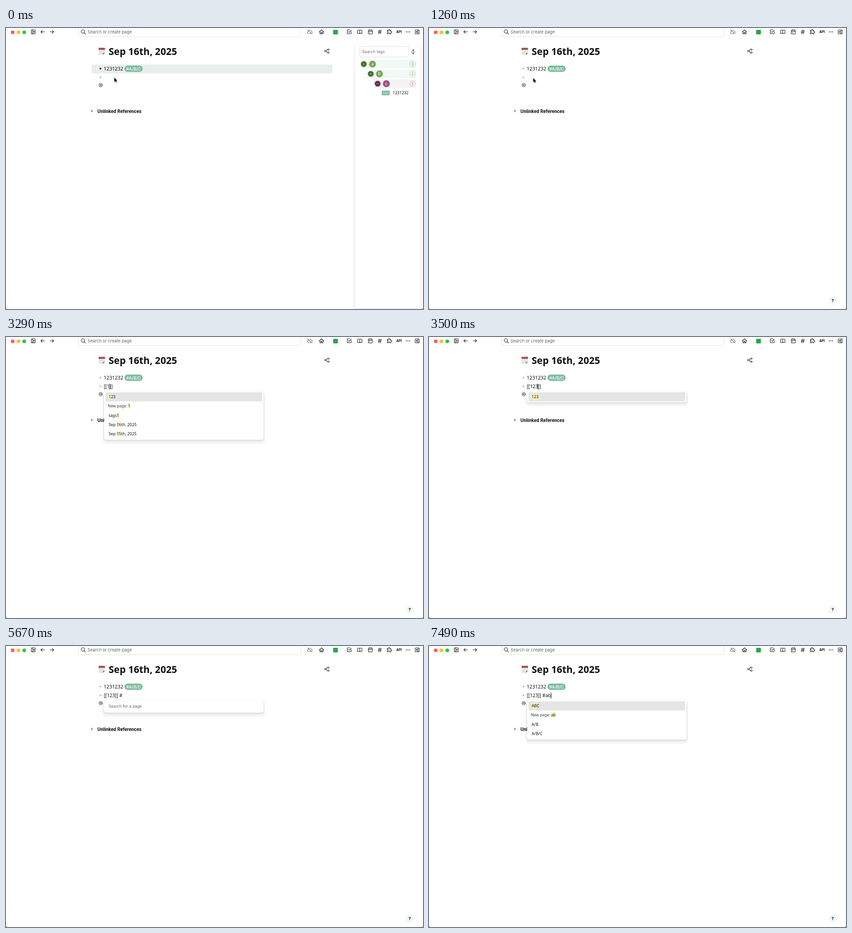
Animation of 910 by 615 pixels, one loop 8 s. Source, as an HTML page:

```html
<!DOCTYPE html>
<html lang="en">
<head>
<meta charset="utf-8">
<title>Notes</title>
<style>
  html, body { margin: 0; width: 100%; height: 100%; overflow: hidden; background: #8d9190; }
  #stage { position: absolute; left: 0; top: 0; width: 910px; height: 615px; overflow: hidden;
    background: #fff; border-radius: 0 0 4px 4px; color: #0c1110; font-family: "Noto Sans", sans-serif; }
  svg { position: absolute; left: 0; top: 0; }
  text { fill: #0c1110; }
  .ui { font-family: Inter, sans-serif; }
  .icon { fill: none; stroke: #141817; stroke-width: 1.05; stroke-linecap: round; stroke-linejoin: round; }
  .thin { stroke-width: .95; }
  .mid { text-anchor: middle; }
  #line { position: absolute; left: 213.4px; top: 98.2px; line-height: 20px; font-size: 10.3px; white-space: pre; }
  #caret { display: inline-block; width: 1px; height: 13px; margin: 0 -.5px; vertical-align: -3px; background: #111; }
  #popup { position: absolute; left: 214px; top: 118px; width: 348px; box-sizing: border-box; padding: 2.5px 3px;
    background: #fff; border-radius: 4px; font-size: 8.8px; white-space: pre;
    box-shadow: 0 0 1px rgba(0,0,0,.22), 0 2px 4px rgba(0,10,8,.13), 0 6px 1px 3px rgba(0,10,8,.036); }
  .item { height: 20.2px; line-height: 20.2px; padding-left: 7px; border-radius: 2px; }
  .item:first-child { background: #e4e6e5; }
  .item.new { height: 21px; padding-left: 5px; font-size: 8.5px; color: #33403c; }
  .hint { height: 23px; padding-left: 7px; font: 8.6px/23px Inter, sans-serif; color: #5c6764; }
  mark { background: #fbf3b2; color: #0c1110; border-radius: 2px; }
  #panel { position: absolute; left: 762px; top: 38px; width: 142px; height: 575px; background: #fff;
    border-radius: 4px; box-shadow: 0 0 1px rgba(0,0,0,.12), 0 2px 4px rgba(0,0,0,.05), 0 4px 1px 5px rgba(0,10,8,.028); }
</style>
</head>
<body>
<div id="stage">
  <svg width="910" height="615">
    <circle cx="14.5" cy="9.5" r="4" fill="#fe5f57"/><circle cx="27.2" cy="9.5" r="4" fill="#febc2e"/><circle cx="39.8" cy="9.5" r="4" fill="#28c840"/>
    <path d="M158.500 0V15.500q0 3.500 3.500 3.500H640q3.500 0 3.500-3.500V0" fill="none" stroke="#dfe3e1"/>
    <text class="ui" x="178" y="12.400" font-size="9.200" style="fill:#5f6664">Search or create page</text>

    <g class="icon">
      <rect x="55.200" y="4" width="8.600" height="8.600" rx="1"/>
      <path d="M58 4v8.600M60.300 6.800l1.700 1.500-1.700 1.500z"/>
      <path d="M84 8.300H76M79.300 5l-3.300 3.300 3.300 3.300M96 8.300h8M100.700 5l3.300 3.300-3.300 3.300"/>
      <circle cx="167.800" cy="7.500" r="3.700"/><path d="M170.600 10.300l3 3"/>
      <path stroke="#707775" d="M661 5.300q4.500-2 5.500 2.200 2.300.3 1.800 2.800M666 12h-6q-2.600-.3-2.500-2.400.2-2 2.600-2.300M658 4l10 9"/>
      <path d="M683.500 8.700l5-4.700 5 4.700M685 7.500v5.200h7V7.500M687.300 12.500V9.300h2.400v3.200"/>
      <path d="M753.300 7.800v3.700q0 1-1 1h-6.600q-1 0-1-1V5q0-1 1-1h5M747 7.900l1.800 1.800 4.800-4.900"/>
      <path d="M772 5.200q-2.500-1.400-4.800-.3v7q2.400-1 4.800.4 2.400-1.400 4.800-.4v-7q-2.300-1.100-4.800.3zv7"/>
      <rect x="790.700" y="4.500" width="8.600" height="8.500" rx="1"/>
      <path d="M793 3.200v2M797 3.200v2M791 7.500h8M793 10h1.500"/>
      <path d="M812.200 6.800h7.300M811.700 10h7.300M814.800 4l-1.300 9M818 4l-1.300 9"/>
      <path d="M833 5.600h1.900q-.6-2.400 1.300-2.400t1.300 2.400h2.200v2.300q2.200-.5 2.200 1.200t-2.200 1.300v2.400h-2.300q.3-2-1.200-2t-1.300 2H832v-2.700q1.900.2 1.900-1.300t-1.900-1.300V5.600z"/>
      <rect x="893" y="4.300" width="8.800" height="8.500" rx="1"/>
      <path d="M899 4.300v8.500M896.900 7l-1.600 1.500 1.600 1.500z"/>
      <g class="thin">
        <circle cx="696.400" cy="50.500" r="1.700"/><circle cx="703.500" cy="47.300" r="1.700"/><circle cx="703.500" cy="53.900" r="1.700"/>
        <path d="M698.100 50.500h1.500M701.800 47.300h-1q-1.200 0-1.200 1.200v4.200q0 1.200 1.200 1.200h1"/>
        <circle cx="206.700" cy="125.100" r="3.600"/>
      </g>
    </g>
    <rect x="714" y="4" width="10.200" height="10" rx="1" fill="#28a745"/>
    <text class="ui mid" x="857.600" y="10.900" font-size="7.100" font-weight="700">API</text>
    <g fill="#141817"><circle cx="873.500" cy="8.400" r="1"/><circle cx="877.200" cy="8.400" r="1"/><circle cx="880.900" cy="8.400" r="1"/><circle cx="206.700" cy="125.100" r="1.300"/></g>

    <g id="notepad">
      <path d="M202.500 44h13.200v10.500l-4 4.200h-9.200z" fill="#e9e9e9" stroke="#cbd0cf" stroke-width=".5"/>
      <rect x="202" y="43.200" width="14" height="4.600" rx=".8" fill="#9a4a48"/>
      <path d="M204 43v1.500M207.300 43v1.500M210.600 43v1.500M213.900 43v1.500" stroke="#e6dada" stroke-width=".8"/>
      <path d="M204 50.500h10M204 53h9M204 55.500h6" stroke="#d2d7d5" stroke-width=".6"/>
      <path d="M215.700 54.500l-4 4.200-.3-4z" fill="#5d7c67"/>
    </g>
    <text x="224" y="59" font-size="21" font-weight="700">Sep 16th, 2025</text>

    <rect id="bar" x="187" y="80" width="525" height="19.500" fill="#e9eeec"/>
    <circle cx="206" cy="88.800" r="2" fill="#b9bfbd"/>
    <circle id="dot" cx="206" cy="88.800" r="2.100" fill="#222927"/>
    <circle cx="206" cy="108" r="2" fill="#bcc2c0"/>
    <text x="213.300" y="92.700" font-size="10.600" font-weight="500">1231232</text>
    <rect x="258.500" y="82.300" width="39.700" height="13.800" rx="6.900" fill="#7dbb9f"/>
    <text class="ui mid" x="278.300" y="92.600" font-size="9.100" font-weight="500" style="fill:#fff">#A/B/C</text>

    <path d="M186 178.200l4 3.400-4 3.400z" fill="#8b918f"/>
    <text x="199.600" y="186" font-size="10.350" font-weight="600" style="font-family:Roboto,sans-serif">Unlinked References</text>
    <circle cx="881" cy="596.500" r="10" fill="#f5f8f7"/>
    <text class="ui mid" x="881" y="600" font-size="9.500" font-weight="700">?</text>
  </svg>

  <div id="line"><span id="before"></span><span id="caret"></span><span id="after"></span></div>
  <div id="popup"></div>

  <div id="side">
    <div id="panel"></div>
    <svg id="tree" width="910" height="615">
      <rect x="772" y="40.500" width="106" height="23" rx="3" fill="#fff" stroke="#dcdfde"/>
      <text class="ui" x="777" y="55.200" font-size="8.800" style="fill:#6c7371">Search tags</text>
      <path class="icon thin" d="M884.500 52h1M888 52h1M891.500 52h1M888.500 46.500v3.500M887 48.700l1.500 1.500 1.500-1.500M888.500 57.500v-3.500M887 55.300l1.500-1.500 1.500 1.500"/>
      <rect x="820" y="137" width="17.300" height="10.200" rx="2" fill="#7dbb9f"/>
      <text class="ui mid" x="828.600" y="144.600" font-size="6.600" style="fill:#fff">TXT</text>
      <text x="844" y="145.200" font-size="8.600" font-weight="500">1231232</text>
    </svg>
  </div>

  <svg id="pointer" width="12" height="16" viewBox="-1 -1 12 16">
    <path d="M0 0v9.300l2.100-1.900 1.500 3.300 1.600-.7-1.500-3.200h2.900z" fill="#000" stroke="#fff" stroke-width=".8" paint-order="stroke"/>
  </svg>
</div>

<script>
const LOOP = 8000, STEP = 70;
const $ = id => document.getElementById(id);

// Tag tree rows: letter, count, indent, y, arrow, badge, row, count edge, count text
[
  ['a', 3, 0, 79, '#4c6d35', '#7ba757', '#f2f8f3', '#a9cfa5', '#6a9a5d'],
  ['b', 2, 15.2, 100.3, '#4c6d35', '#7ba757', '#f2f8f3', '#a9cfa5', '#6a9a5d'],
  ['c', 1, 30.2, 121.8, '#6b2b53', '#a15280', '#f5f3f4', '#dba9c4', '#a15280']
].forEach(([tag, count, dx, y, dark, fill, row, edge, ink]) => {
  $('tree').insertAdjacentHTML('beforeend', `
    <rect x="${772 + dx}" y="${y - 9.5}" width="${124 - dx}" height="19" rx="3" fill="${row}"/>
    <circle cx="${780.8 + dx}" cy="${y}" r="6.4" fill="${dark}"/>
    <path d="M${779 + dx} ${y - .8}l1.800 1.800 1.800-1.800" fill="none" stroke="#fff" stroke-width=".9"/>
    <circle cx="${799.8 + dx}" cy="${y}" r="7.600" fill="${fill}"/>
    <text class="ui mid" x="${799.8 + dx}" y="${y + 3}" font-size="8.600" style="fill:#fff">${tag}</text>
    <circle cx="887" cy="${y}" r="6" fill="${row}" stroke="${edge}" stroke-width=".9"/>
    <text class="ui mid" x="887" y="${y + 2.7}" font-size="7.400" style="fill:${ink}">${count}</text>`);
});

// Matches are wrapped in braces
const menus = {
  hint: null,
  one: ['{1}23', 'New page: {1}', 'tags{1}', 'Sep {1}6th, 2025', 'Sep {1}5th, 2025'],
  two: ['{12}3', 'New page: {12}'],
  three: ['{123}'],
  a: ['{A}', '{A}/B', '{A}BC', 'W{A}IT', 'c{a}rd', '{A}/B/C', 'L{A}TER', 't{a}gs1', 't{a}gs2', 't{a}gs3',
      't{a}gs4', 'W{A}ITING', 'C{A}NCELED', 'C{A}NCELLED', 'F{a}vorites'],
  ab: ['{AB}C', 'New page: {ab}', 'A/B', 'A/B/C']
};
const menuHtml = name => menus[name]
  ? menus[name].map(s => `<div class="item${s.startsWith('New') ? ' new' : ''}">` +
      s.replace('{', '<mark>').replace('}', '</mark>') + '</div>').join('')
  : '<div class="hint">Search for a page</div>';

// Time, text before caret, text after, caret shown, menu
const edits = [
  [0, '', '', 0],
  [910, '', '', 1],
  [1260, '', '', 0],
  [1820, '', '', 1],
  [2100, '[', ']', 1],
  [2310, '[[', ']]', 1, 'hint'],
  [2870, '[[', ']]', 0, 'hint'],
  [3290, '[[1', ']]', 1, 'one'],
  [3360, '[[12', ']]', 1, 'two'],
  [3500, '[[123', ']]', 1, 'three'],
  [3920, '[[123]]', '', 1],
  [4480, '[[123]]', '', 0],
  [4760, '[[123]] ', '', 1],
  [5110, '[[123]] #', '', 1, 'hint'],
  [5670, '[[123]] #', '', 0, 'hint'],
  [5880, '[[123]] #a', '', 1, 'a'],
  [6440, '[[123]] #ab', '', 1, 'ab'],
  [7000, '[[123]] #ab', '', 0, 'ab'],
  [7490, '[[123]] #ab', '', 1, 'ab']
];

// Time, x, y of the pointer tip
const moves = [
  [0, 236.4, 108.6], [70, 235, 109.6], [210, 229, 107], [280, 231, 104.4], [420, 228, 104], [490, 225.8, 103.8],
  [630, 225, 110], [700, 224, 118], [770, 225, 123], [840, 226, 115], [910, 227.5, 109.6]
];

const at = (rows, t) => rows.findLast(r => r[0] <= t);
let shown;

function draw(t) {
  const edit = at(edits, t);
  if (edit !== shown) {
    const [, before, after, caret, menu] = shown = edit;
    $('before').textContent = before;
    $('after').textContent = after;
    $('caret').style.visibility = caret ? 'visible' : 'hidden';
    $('popup').style.display = menu ? 'block' : 'none';
    $('popup').innerHTML = menu ? menuHtml(menu) : '';
  }
  const [, x, y] = at(moves, t);
  $('pointer').style.transform = `translate(${x - 1}px, ${y - 1}px)`;
  $('pointer').style.display = t < 2170 ? 'block' : 'none';
  $('side').style.opacity = t < 210 ? 1 : t < 280 ? .4 : 0;
  const fade = Math.floor((t - 560) / STEP) / 5;
  $('bar').style.opacity = $('dot').style.opacity = 1 - Math.min(1, Math.max(0, fade));
}

const start = performance.now();
function tick() {
  draw((performance.now() - start) % LOOP);
  requestAnimationFrame(tick);
}
tick();
</script>
</body>
</html>
```
